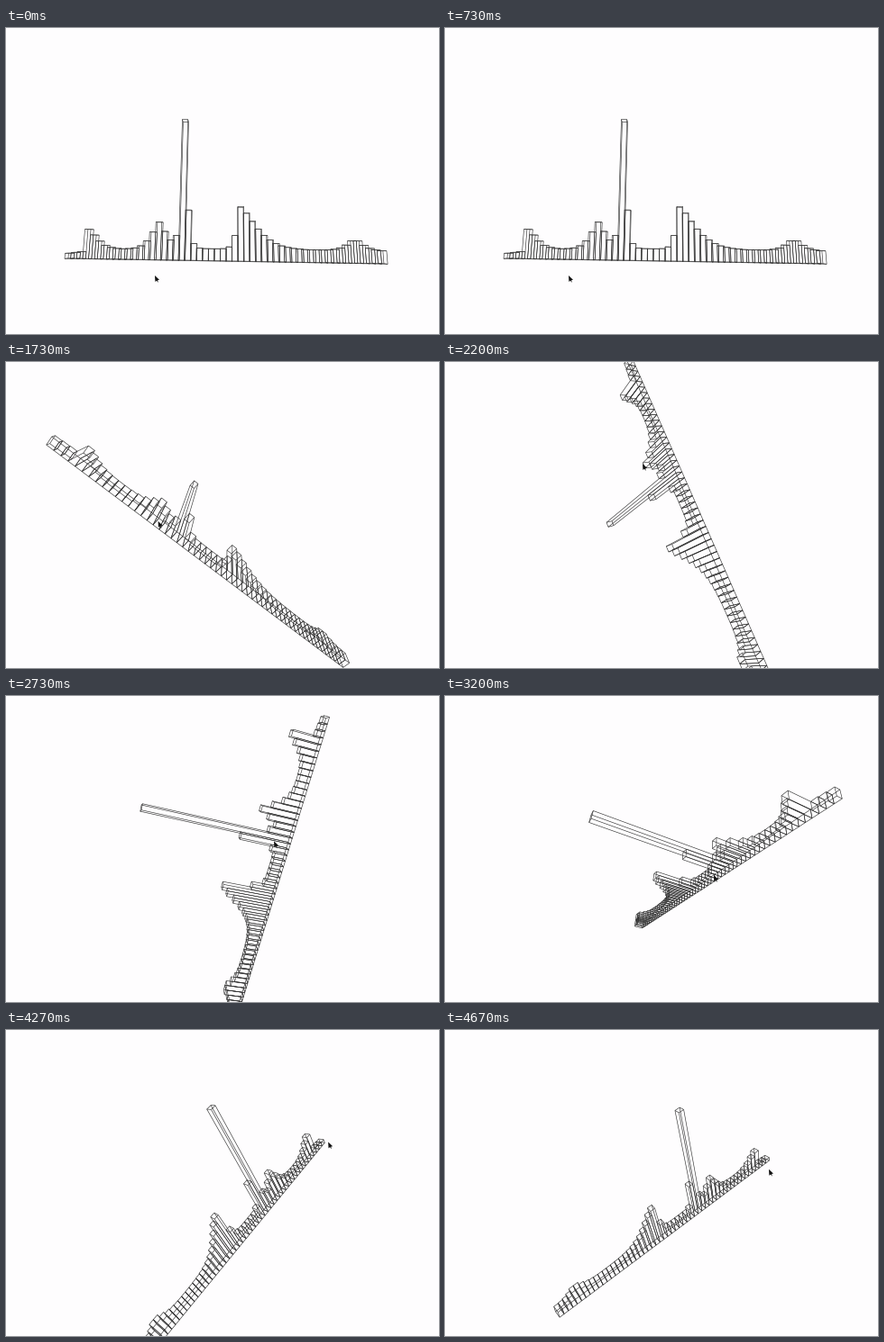
Animation of 480 by 340 pixels, one loop 4.74 s. Source, as a matplotlib script:

```python
import numpy as np
import matplotlib.pyplot as plt
from matplotlib.animation import FuncAnimation
from matplotlib.collections import LineCollection
from matplotlib.patches import Polygon

W, H, DPI = 480, 340, 100
LOOP, INTERVAL = 4740, 30
STEP = 200 / 3                  # the picture advances 15 times a second
FOCAL = 365
COUNT, LENGTH, DEPTH, DROP = 54, 354, 8.5, 89
PITCH = LENGTH / COUNT
SPIKE = 19
INK, PAPER = "#333333", "#fefdfe"


def peak(i, at, height, rise, fall):
    d = i - at
    return height * np.exp(-np.abs(d / np.where(d < 0, rise, fall)) ** 1.4)


bars = np.arange(COUNT)
heights = 13 - 7.5 * np.exp(-bars / 8)
heights += peak(bars, 3, 23, 0.3, 2.2) + peak(bars, 15, 28, 1.7, 1.8)
heights += peak(bars, SPIKE, 142, 0.5, 0.85)
heights += peak(bars, 29, 45, 0.9, 3.7) + peak(bars, 48.5, 12, 1.9, 1.9)

# time, base start, base end, spike top, pointer,
# then the depth of base end and spike top relative to base start
VIEWS = [
    (1000, (67, 256), (421, 262), (199, 103), (117, 275), 1, 1.08),
    (1330, (54, 230), (411, 281), (211, 107), (125, 232), 1.07, 1.16),
    (2200, (205, -2), (368, 372), (183, 180), (219, 113), 0.85, 1.28),
    (2730, (356, 24), (257, 352), (150, 124), (297, 161), 1.256, 1.013),
    (3200, (439, 109), (219, 255), (162, 134), (298, 199), 2.2, 1.229),
    (3800, (334, 105), (204, 409), (186, 93), (355, 89), 0.7, 0.726),
    (4670, (357, 144), (126, 316), (260, 89), (359, 155), 0.87, 0.76),
]
ARROW = np.array([(0, 0), (0.4, 7), (1.9, 5.7), (3.8, 8), (3.1, 5.2), (5, 4.8)])


def ray(point):
    return np.array([(point[0] - W / 2) / FOCAL, (point[1] - H / 2) / FOCAL, 1])


def pose(start, end, top, end_depth, top_depth):
    """Rotation, residual shape and pivot of the chart in camera space."""
    a, b, c = ray(start), end_depth * ray(end), top_depth * ray(top)
    scale = LENGTH / np.linalg.norm(b - a)
    a, b, c = a * scale, b * scale, c * scale
    x = (b - a) / LENGTH
    up = (c - a - x * PITCH * (SPIKE + 0.5)) / heights[SPIKE]
    y = up - up.dot(x) * x
    y /= np.linalg.norm(y)
    z = np.cross(x, y)
    rot = np.column_stack([x, y, z])
    shape = rot.T @ np.column_stack([x, up, z])
    return rot, shape, (a + b) / 2 + DROP * up


def turn(r0, r1, f):
    """Rotate from r0 towards r1 by the fraction f along the shortest arc."""
    rel = r0.T @ r1
    angle = np.arccos(np.clip((np.trace(rel) - 1) / 2, -1, 1))
    k = (rel - rel.T) / (2 * np.sin(angle))
    part = angle * f
    return r0 @ (np.eye(3) + np.sin(part) * k + (1 - np.cos(part)) * k @ k)


times = [v[0] for v in VIEWS]
tips = np.array([v[4] for v in VIEWS])
poses = [pose(*v[1:4], *v[5:]) for v in VIEWS]


def camera(t):
    place = np.interp(t, times, range(len(times)))
    i = min(int(place), len(times) - 2)
    f = place - i
    (r0, s0, p0), (r1, s1, p1) = poses[i], poses[i + 1]
    return turn(r0, r1, f) @ (s0 + (s1 - s0) * f), p0 + (p1 - p0) * f


def pointer(t):
    x, y = (np.interp(t, times, tips[:, c]) for c in (0, 1))
    return x + np.interp(t, (640, 800), (48, 0)), y


# corner number holds one bit each for x, y and z
bits = np.array([(n & 1, n >> 1 & 1, n >> 2) for n in range(8)])
edges = np.array([(n, n | b) for b in (1, 2, 4) for n in range(8) if not n & b])
corners = np.stack([
    (bars[:, None] + bits[:, 0]) * PITCH - LENGTH / 2,
    heights[:, None] * bits[:, 1] - DROP,
    np.broadcast_to((bits[:, 2] - 0.5) * DEPTH, (COUNT, 8))], axis=-1)


def segments(t):
    matrix, pivot = camera(t)
    p = corners @ matrix.T + pivot
    flat = p[..., :2] / p[..., 2:] * FOCAL + (W / 2, H / 2)
    return flat[:, edges].reshape(-1, 2, 2)


fig = plt.figure(figsize=(W / DPI, H / DPI), dpi=DPI, facecolor=PAPER)
ax = fig.add_axes([0, 0, 1, 1])
ax.set_xlim(0, W)
ax.set_ylim(H, 0)
ax.axis("off")
wires = LineCollection([], colors=INK, linewidths=0.45)
ax.add_collection(wires)
arrow = Polygon(ARROW, closed=True, facecolor="#111111", edgecolor="none", zorder=5)
ax.add_patch(arrow)


def draw(frame):
    t = int((frame + 1) * INTERVAL / STEP) * STEP
    wires.set_segments(segments(t))
    arrow.set_xy(ARROW + pointer(t))
    return wires, arrow


anim = FuncAnimation(fig, draw, frames=LOOP // INTERVAL, interval=INTERVAL,
                     init_func=lambda: draw(0), repeat=True, repeat_delay=0)
plt.show()
```
